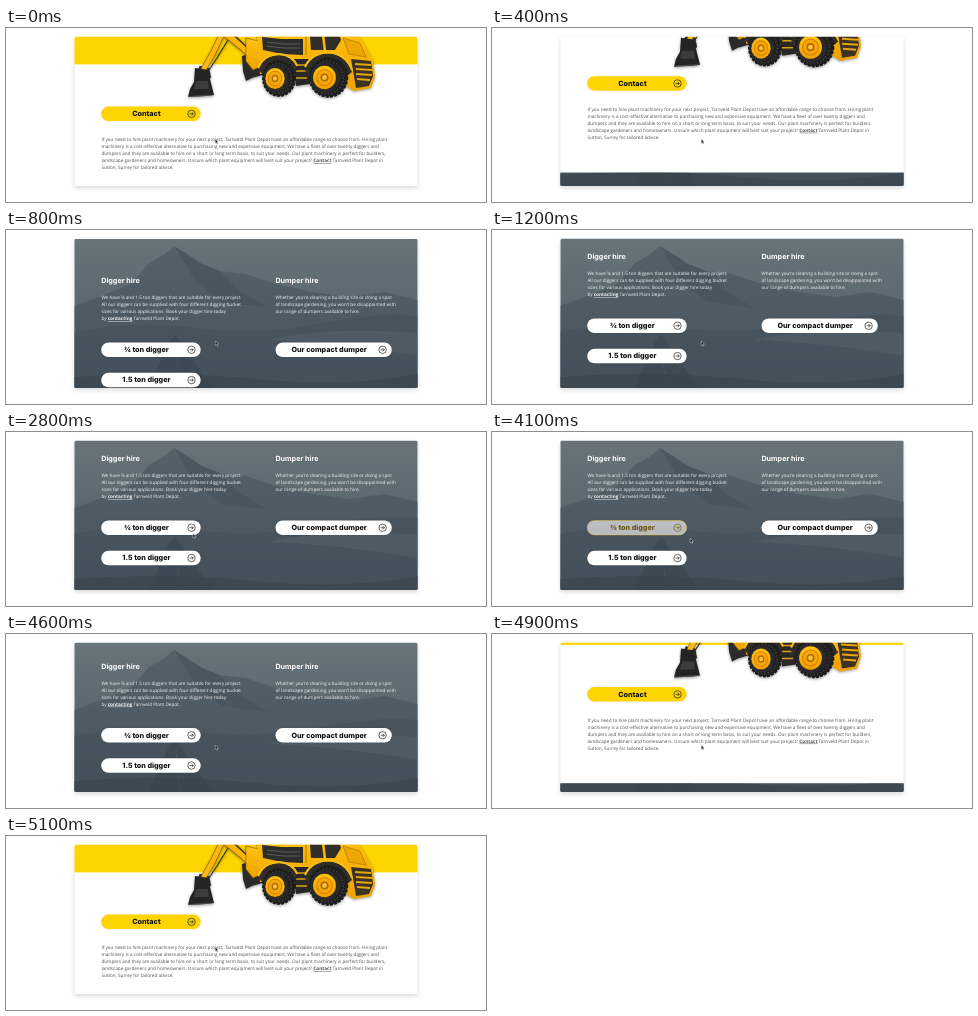
An HTML page that plays this animation: 480 by 174 pixels, repeating every 5.2 s.

```html
<!DOCTYPE html>
<html lang="en">
<head>
<meta charset="utf-8">
<title>Plant hire page scroll</title>
<style>
html, body { margin: 0; width: 100%; height: 100%; overflow: hidden; background: #fff; }
svg { display: block; width: 100vw; height: 100vh; }
text { text-rendering: geometricPrecision; }
.copy { font: 400 4.65px "Open Sans", "Noto Sans", sans-serif; }
.copy .link { font-weight: 700; text-decoration: underline; }
.bold { font: 700 7.2px Inter, "Open Sans", sans-serif; }
.mid { font-weight: 800; text-anchor: middle; }
.shadow { filter: drop-shadow(0 2.5px 2px rgba(0, 0, 0, .15)); }
.pill { filter: drop-shadow(0 .6px .8px rgba(0, 0, 0, .1)); }
#digger { filter: drop-shadow(0 1.6px 1.6px rgba(0, 0, 0, .4)); }
</style>
</head>
<body>
<svg viewBox="0 0 480 174" preserveAspectRatio="none">
  <defs>
    <clipPath id="cardClip"><rect x="68.5" y="8.7" width="343" height="149.3" rx="1.5"/></clipPath>
    <clipPath id="darkClip"><rect id="darkEdge" x="68" y="175" width="344" height="230"/></clipPath>
    <linearGradient id="sky" x2="0" y2="1">
      <stop offset="0" stop-color="#68747a"/>
      <stop offset=".45" stop-color="#5c6870"/>
      <stop offset="1" stop-color="#46525c"/>
    </linearGradient>
    <linearGradient id="ridge" x2="0" y2="1">
      <stop offset="0" stop-color="#4d5962"/>
      <stop offset="1" stop-color="#47535d"/>
    </linearGradient>
    <linearGradient id="paint" x2="0" y2="1">
      <stop offset="0" stop-color="#ffc40f"/>
      <stop offset="1" stop-color="#f0a000"/>
    </linearGradient>
  </defs>

  <rect class="shadow" x="68.5" y="8.7" width="343" height="149.3" rx="1.5" fill="#fff"/>

  <g clip-path="url(#cardClip)">
    <g id="page">
      <rect x="68" y="-20" width="344" height="56.4" fill="#ffd403"/>
      <g id="digger"></g>
      <g id="intro"></g>
    </g>
    <g clip-path="url(#darkClip)">
      <rect x="68" y="8" width="344" height="151" fill="url(#sky)"/>
      <path d="M68 76 L96 66 L126 53 L143 33 L157 25 L168 16 L181 24 L196 34 L214 41 L240 44 L270 54 L306 62 L344 67 L378 62 L412 70 V159 H68Z" fill="url(#ridge)" opacity=".7"/>
      <path d="M168 16 L181 24 L196 34 L214 41 L232 60 L262 78 L216 72 L190 52Z" fill="#414e58" opacity=".45"/>
      <path d="M68 102 Q130 90 190 98 T310 94 T412 86 V159 H68Z" fill="#424f59" opacity=".55"/>
      <path d="M262 110 Q320 96 412 103 V126 Q330 112 262 110Z" fill="#5d6972" opacity=".4"/>
      <path d="M142 159 L163 112 L170 104 L174 112 L208 159Z" fill="#394650" opacity=".6"/>
      <path d="M174 159 L170 116" stroke="#6a767d" stroke-width=".5" stroke-dasharray="4 3" opacity=".6"/>
      <path d="M68 147 Q160 140 250 149 T412 144 V159 H68Z" fill="#39444e" opacity=".65"/>
      <g id="hire"></g>
    </g>
  </g>

  <path id="cursor" d="M0 0 V4.4 L1 3.5 L1.75 5.2 L2.5 4.85 L1.8 3.2 H3.1Z" fill="#111" stroke="#fff" stroke-width=".4"/>
</svg>

<script>
const LOOP = 5200, STEP = 100, SCROLL = 190, DARK_TOP = 175;
const $ = id => document.getElementById(id);

function copy(x, y, color, lines) {
  return lines.map((s, i) =>
    `<text class="copy" x="${x}" y="${y + i * 7}" fill="${color}">${s}</text>`).join('');
}
const link = s => `<tspan class="link">${s}</tspan>`;
const heading = (x, y, s) => `<text class="bold" x="${x}" y="${y}" fill="#fff">${s}</text>`;

function pill(x, y, w, label, fill, id = '') {
  const ix = x + w - 9.2, cy = y + 7.25;
  return `<g id="${id}">
    <rect class="pill" x="${x}" y="${y}" width="${w}" height="14.5" rx="7.25" fill="${fill}"/>
    <text class="bold mid" x="${x + w / 2 - 4.5}" y="${cy + 2.3}" fill="#111">${label}</text>
    <g class="icon" fill="none" stroke="#111" stroke-width=".65">
      <circle cx="${ix}" cy="${cy}" r="3.7"/>
      <path d="M${ix - 2} ${cy} h3.8 m-1.6 -1.6 l1.6 1.6 l-1.6 1.6"/>
    </g></g>`;
}

// Tyre seen at an angle: the rim sits left of the tread's centre.
function wheel(x, y, rx, ry) {
  const ring = (k, dx, fill, extra = '') =>
    `<ellipse cx="${x - dx}" cy="${y}" rx="${rx * k}" ry="${ry * k}" fill="${fill}" ${extra}/>`;
  return ring(.94, 0, '#202021', 'stroke="#1c1c1d" stroke-width="2" stroke-dasharray="3 1.2"') +
    ring(.8, 1.2, 'none', 'stroke="#4a4a4c" stroke-width="1.4" stroke-dasharray="1 2.4"') +
    ring(.74, 3, '#29292b') + ring(.57, 4, 'url(#paint)') + ring(.42, 4, '#d98200') +
    ring(.36, 4, '#f7a70a') + ring(.2, 4, '#b06a00') + ring(.12, 4, '#ffc43a');
}

const shape = (d, fill, extra = '') => `<path d="${d}" fill="${fill}" ${extra}/>`;
const line = (d, color, w) => shape(d, 'none', `stroke="${color}" stroke-width="${w}" stroke-linejoin="round"`);

$('digger').innerHTML =
  // boom, stick and rams
  line('M252 33 L235 18 L219 5', '#8a6100', 7) +
  line('M252 33 L235 18 L219 5', '#f9b50c', 5.6) +
  line('M217 4 L207 25 L196 44', '#8a6100', 6) +
  line('M217 4 L207 25 L196 44', '#f9b710', 4.8) +
  line('M222 12 L211 30 L203 42', '#39352d', 1.3) +
  line('M229 8 L246 24', '#3a3427', 1.4) +
  line('M195 38 L191 48 M202 40 L204 50', '#2c2b29', 2.4) +
  // bucket
  shape('M189 40 L203 42 L204 51 L208 67 L201 68 L182 69 L184 61 L188 54Z', '#242425') +
  shape('M190 53 L202 53 L203 61 L188 61Z', '#3c3c3e') +
  line('M182 68.6 L206 67', '#5f5e5c', .7) +
  // swing post and stabiliser
  shape('M236 28 L252 23 L260 46 L246 50 L240 53 L237 43Z', '#2b2a28') +
  shape('M240 10 L256 14 L257 37 L247 42 L240 33Z', 'url(#paint)', 'stroke="#8a6100" stroke-width=".6"') +
  // chassis, engine vents and rear
  shape('M250 -4 H345 L357 14 L367 33 L369 48 L365 60 L348 63 L334 54 H288 L282 46 H254Z', 'url(#paint)') +
  shape('M256 9 L276 11 H297 V27 L276 26 L257 22Z', '#2c2d2d') +
  line('M261 14 L277 16 H294 M261 18 L277 20 H294', '#62625e', .9) +
  line('M250 3 H296 M300 -2 V27', '#a46f00', .9) +
  shape('M303 -4 H330 L335 12 L329 22 H305Z', '#302e2b') +
  line('M304 5 H334 M316 -2 L319 23', '#f6b40f', 2.6) +
  shape('M287 31 H304 V56 L290 58Z', '#292826') +
  line('M290 37 H302 M290 43 H302 M290 50 H301', '#dba114', 1.5) +
  shape('M337 10 L354 15 L360 29 L343 26Z', '#eca705', 'stroke="#a47200" stroke-width=".6"') +
  shape('M345 31 L365 33 L367 48 L363 58 L350 60Z', '#3a3323') +
  line('M349 36 L365 37 M350 41 L366 42 M350 46 L366 47 M351 51 L364 52', '#e9a50c', 2) +
  // mudguards
  shape('M253 42 Q256 28 273 27 Q288 28 291 42 L288 46 L256 46Z', '#302d27') +
  shape('M299 42 Q303 26 323 25 Q340 27 346 44 L340 49 L302 49Z', '#302d27') +
  line('M252 40 Q257 27 273 26 Q287 27 291 38', '#fabb19', 2) +
  line('M299 39 Q305 25 323 24.5 Q340 26 346 42', '#fabb19', 2) +
  wheel(273, 50.5, 17, 18.5) + wheel(322.5, 49.5, 20, 20.5);

$('intro').innerHTML = pill(95.2, 78.6, 99.5, 'Contact', '#ffd403') +
  copy(95.4, 113.1, '#505050', [
    'If you need to hire plant machinery for your next project, Tarnveld Plant Depot have an affordable range to choose from. Hiring plant',
    'machinery is a cost-effective alternative to purchasing new and expensive equipment. We have a fleet of over twenty diggers and',
    'dumpers and they are available to hire on a short or long term basis, to suit your needs. Our plant machinery is perfect for builders,',
    `landscape gardeners and homeowners. Unsure which plant equipment will best suit your project? ${link('Contact')} Tarnveld Plant Depot in`,
    'Sutton, Surrey for tailored advice.'
  ]);

$('hire').innerHTML = heading(95.2, 29.4, 'Digger hire') + heading(269.4, 29.4, 'Dumper hire') +
  copy(95.4, 45.1, '#f3f4f5', [
    'We have ¾ and 1.5 ton diggers that are suitable for every project.',
    'All our diggers can be supplied with four different digging bucket',
    'sizes for various applications. Book your digger hire today',
    `by ${link('contacting')} Tarnveld Plant Depot.`
  ]) +
  copy(269.5, 45.1, '#f3f4f5', [
    'Whether you’re clearing a building site or doing a spot',
    'of landscape gardening, you won’t be disappointed with',
    'our range of dumpers available to hire.'
  ]) +
  pill(95.2, 88.5, 99.5, '¾ ton digger', '#fff', 'hot') +
  pill(95.2, 118.8, 99.5, '1.5 ton digger', '#fff') +
  pill(269.5, 88.5, 116.3, 'Our compact dumper', '#fff');

const hot = {
  box: $('hot').querySelector('rect'),
  label: $('hot').querySelector('text'),
  icon: $('hot').querySelector('.icon')
};

// Each move: [start, end, from, to]
const moves = {
  scroll: [[0, 1170, 0, SCROLL], [4480, 5100, SCROLL, 0]],
  reach: [[2300, 3080, 0, 1], [3550, 4580, 1, 0]],
  hover: [[2820, 3300, 0, 1], [3920, 4250, 1, 0]]
};
const ease = p => p < .5 ? 4 * p ** 3 : 1 - (2 - 2 * p) ** 3 / 2;

function valueAt(list, t) {
  let v = list[0][2];
  for (const [start, end, from, to] of list) {
    if (t >= start) v = from + (to - from) * ease(Math.min(1, (t - start) / (end - start)));
  }
  return v;
}

const mix = (a, b, k) => `rgb(${a.map((c, i) => Math.round(c + (b[i] - c) * k))})`;

function draw(t) {
  const scroll = valueAt(moves.scroll, t);
  $('page').setAttribute('transform', `translate(0 ${-scroll})`);
  $('hire').setAttribute('transform', `translate(0 ${SCROLL - scroll})`);
  $('darkEdge').setAttribute('y', DARK_TOP - scroll);

  const r = valueAt(moves.reach, t);
  $('cursor').setAttribute('transform', `translate(${209.3 - 27.5 * r} ${111 - 11.8 * r})`);

  const h = valueAt(moves.hover, t);
  const ink = mix([17, 17, 17], [255, 204, 30], h);
  hot.box.setAttribute('fill', `rgba(255,255,255,${1 - h})`);
  hot.box.setAttribute('stroke', `rgba(255,204,30,${h})`);
  hot.label.setAttribute('fill', ink);
  hot.icon.setAttribute('stroke', ink);
}

function tick(now) {
  draw(Math.floor((now % LOOP) / STEP) * STEP);
  requestAnimationFrame(tick);
}
draw(0);
requestAnimationFrame(tick);
</script>
</body>
</html>
```
